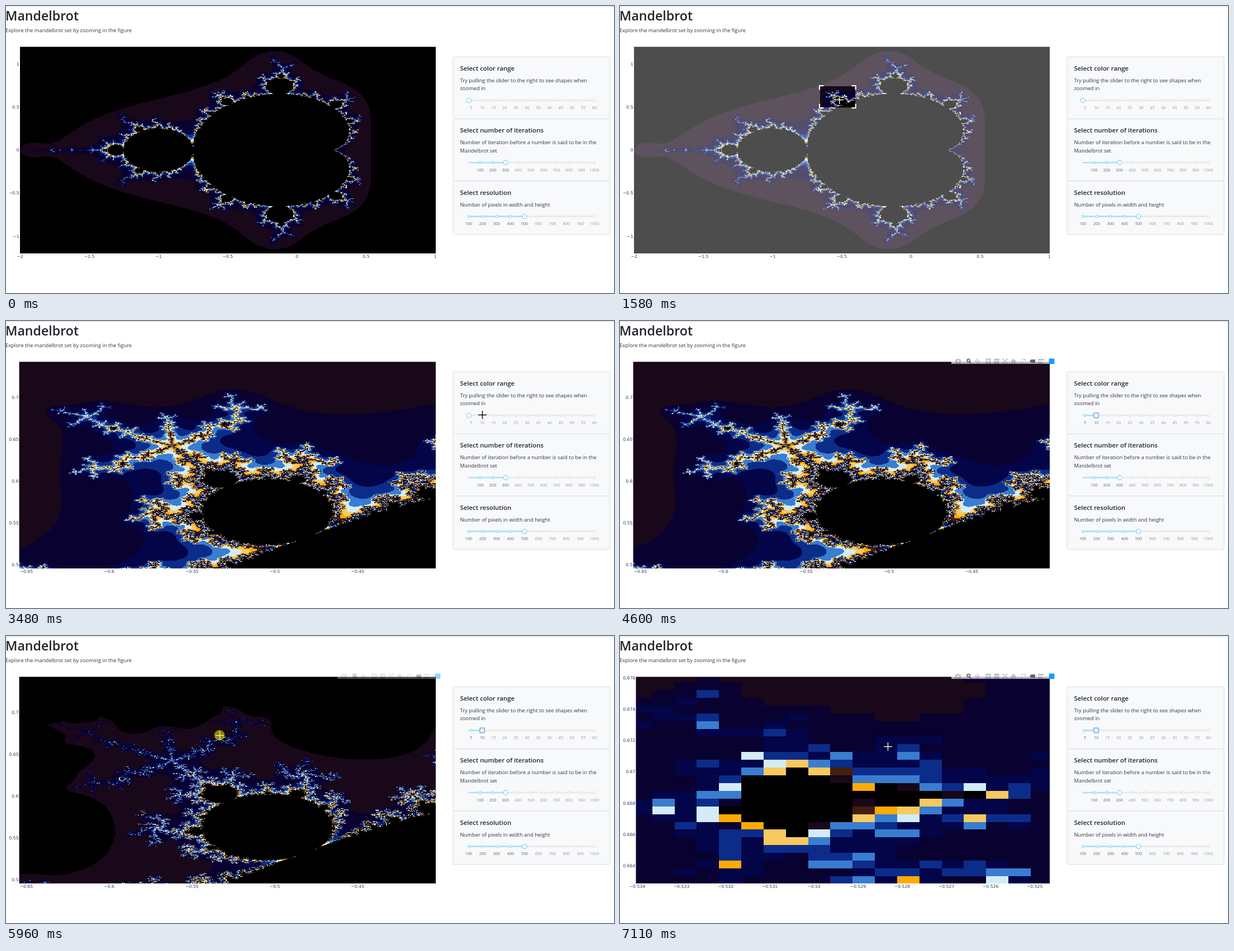
An HTML page with a canvas that plays this animation: 1088x515 px, repeating every 8 s.

```html
<!DOCTYPE html>
<html lang="en">
<head>
<meta charset="utf-8">
<title>Mandelbrot</title>
<style>
  html, body { margin: 0; width: 100%; height: 100%; overflow: hidden; background: #fff; }
  canvas, svg { position: absolute; left: 0; top: 0; width: 1088px; height: 515px; }
  text { font-family: "Open Sans", "Noto Sans", sans-serif; fill: #212529; }
  .h1 { font-size: 23.2px; font-weight: 600; }
  .h2 { font-size: 11.4px; font-weight: 600; }
  .p { font-size: 9.36px; fill: #32373c; }
  .mark { font-size: 7.4px; fill: #999; text-anchor: middle; }
  .on { fill: #666; }
  .tick { font: 7.7px "DejaVu Sans", Verdana, sans-serif; fill: #2a3f5f; }
  #invert { mix-blend-mode: difference; }
</style>
</head>
<body>
<canvas id="plot" width="1088" height="515"></canvas>
<svg id="page" viewBox="0 0 1088 515"></svg>
<svg id="invert" viewBox="0 0 1088 515"></svg>
<svg id="top" viewBox="0 0 1088 515"></svg>
<script>
const LOOP = 8000, GRID = 500, MAX_ITER = 300;
const RIGHT = 769, TOP = 73.2, BOTTOM = 444;
const BLACK = '000000';
const CYCLE = ['421e0f', '19071a', '09012f', '040449', '0c2c8a', '397dd1', 'd3ecf8', 'f8c95f', 'ffaa00'];
const $ = id => document.getElementById(id);

function add(parent, tag, attrs, text) {
  const el = document.createElementNS('http://www.w3.org/2000/svg', tag);
  for (const k in attrs) el.setAttribute(k, attrs[k]);
  if (text !== undefined) el.textContent = text;
  return parent.appendChild(el);
}
const show = (el, on) => { el.style.display = on ? '' : 'none'; };

// ticks: [first value, step, count]
const VIEWS = [
  { left: 24.6, x: [-2.003, 1.003], y: [-1.2024, 1.2024], xt: [-2, 0.5, 7], yt: [-1, 0.5, 5] },
  { left: 23.6, x: [-0.65434, -0.4029], y: [0.4955, 0.7429], xt: [-0.65, 0.05, 5], yt: [0.5, 0.05, 5] },
  { left: 28.5, x: [-0.53403, -0.52466], y: [0.66286, 0.67607], xt: [-0.534, 0.001, 10], yt: [0.664, 0.002, 7] }
];
const toX = (v, x) => v.left + (x - v.x[0]) / (v.x[1] - v.x[0]) * (RIGHT - v.left);
const toY = (v, y) => TOP + (v.y[1] - y) / (v.y[1] - v.y[0]) * (BOTTOM - TOP);

// ---- fractal data ----
function escapeCount(cx, cy) {
  const q = (cx - 0.25) ** 2 + cy * cy;
  if (q * (q + cx - 0.25) < cy * cy / 4 || (cx + 1) ** 2 + cy * cy < 1 / 16) return 0;
  let x = 0, y = 0;
  for (let k = 1; k <= MAX_ITER; k++) {
    const t = x * x - y * y + cx;
    y = 2 * x * y + cy;
    x = t;
    if (x * x + y * y > 4) return k;
  }
  return 0;
}

function sample(x, y) {
  const dx = (x[1] - x[0]) / (GRID - 1), dy = (y[1] - y[0]) / (GRID - 1);
  const counts = new Uint16Array(GRID * GRID);
  for (let j = 0; j < GRID; j++)
    for (let i = 0; i < GRID; i++)
      counts[j * GRID + i] = escapeCount(x[0] + i * dx, y[1] - j * dy);
  return { counts, x: [x[0] - dx / 2, x[1] + dx / 2], y: [y[0] - dy / 2, y[1] + dy / 2] };
}

// The set and the first band are black, later bands run through the cycle.
function paint(data, range) {
  const canvas = document.createElement('canvas');
  canvas.width = canvas.height = GRID;
  const g = canvas.getContext('2d'), img = g.createImageData(GRID, GRID);
  const rgb = h => [0, 2, 4].map(i => parseInt(h.substr(i, 2), 16));
  const black = rgb(BLACK), cycle = CYCLE.map(rgb);
  data.counts.forEach((k, p) => {
    const band = Math.floor((k - 1) / range);
    const c = band > 0 ? cycle[band % cycle.length] : black;
    img.data.set([c[0], c[1], c[2], 255], p * 4);
  });
  g.putImageData(img, 0, 0);
  return { canvas, x: data.x, y: data.y };
}

const wide = sample([-2, 1], [-1.2, 1.2]);
const close = sample(VIEWS[1].x, VIEWS[1].y);
const wideMap = paint(wide, 4), closeMap = paint(close, 4), closeMap10 = paint(close, 10);
const PHASES = [
  { t: 0, map: wideMap, view: 0 },
  { t: 1700, map: wideMap, view: 1 },
  { t: 3250, map: closeMap, view: 1 },
  { t: 4635, map: closeMap10, view: 1 },
  { t: 6950, map: closeMap10, view: 2 }
];

const ctx = $('plot').getContext('2d');
function drawPlot({ map, view }) {
  const v = VIEWS[view];
  ctx.clearRect(0, 0, 1088, 515);
  ctx.save();
  ctx.beginPath();
  ctx.rect(v.left, TOP, RIGHT - v.left, BOTTOM - TOP);
  ctx.clip();
  ctx.imageSmoothingEnabled = false;
  const x = toX(v, map.x[0]), y = toY(v, map.y[1]);
  ctx.drawImage(map.canvas, x, y, toX(v, map.x[1]) - x, toY(v, map.y[0]) - y);
  ctx.restore();
}

// ---- page ----
const page = $('page');
add(page, 'rect', { x: 0, y: 0.4, width: 1088, height: 1.2, fill: '#dcdce0' });
add(page, 'text', { class: 'h1', x: -1, y: 26.4 }, 'Mandelbrot');
add(page, 'text', { class: 'p', x: -1, y: 47.4 }, 'Explore the mandelbrot set by zooming in the figure');

const axes = VIEWS.map(v => {
  const g = add(page, 'g', {});
  const each = ([start, step, n], fn) => {
    for (let i = 0; i < n; i++) {
      const val = +(start + i * step).toFixed(3);
      fn(val, String(val).replace('-', '\u2212'));
    }
  };
  each(v.xt, (x, s) => add(g, 'text', { class: 'tick', x: toX(v, x), y: 452.4, 'text-anchor': 'middle' }, s));
  each(v.yt, (y, s) => add(g, 'text', { class: 'tick', x: v.left - 1, y: toY(v, y) + 2.8, 'text-anchor': 'end' }, s));
  return g;
});

function card(y, h, title, lines) {
  add(page, 'rect', { x: 800, y: y + 0.5, width: 281, height: h, rx: 2.5, fill: '#f8f9fb', stroke: '#dadcdf' });
  add(page, 'text', { class: 'h2', x: 812.5, y: y + 25 }, title);
  lines.forEach((s, i) => add(page, 'text', { class: 'p', x: 812.5, y: y + 46 + i * 14.7 }, s));
}

function slider(y, min, max, marks, value, focus) {
  const g = add(page, 'g', {}), px = v => 828 + (v - min) / (max - min) * 225;
  const bar = (to, fill) => add(g, 'rect', { x: 827.5, y: y - 1.3, width: to - 827.5, height: 2.6, rx: 1.3, fill });
  bar(1053.5, '#e9e9e9');
  bar(px(value), '#abe2fb');
  marks.forEach(m => {
    const on = m <= value;
    add(g, 'circle', { cx: px(m), cy: y, r: 2, fill: '#fff', stroke: on ? '#96dbfa' : '#e4e4e4', 'stroke-width': 1.3 });
    add(g, 'text', { class: on ? 'mark on' : 'mark', x: px(m), y: y + 15.6 }, m);
  });
  add(g, 'circle', { cx: px(value), cy: y, r: 4, fill: '#fff', stroke: '#8ed6f8', 'stroke-width': 1.4 });
  if (focus) add(g, 'rect', { x: px(value) - 4.4, y: y - 4.4, width: 8.8, height: 8.8, rx: 1,
                              fill: 'none', stroke: '#86aede', 'stroke-width': 1.4 });
  return g;
}

const steps = (from, step, n) => Array.from({ length: n }, (_, i) => from + i * step);
const hundreds = steps(100, 100, 10), fives = steps(5, 5, 12);
card(90.5, 111.5, 'Select color range', ['Try pulling the slider to the right to see shapes when', 'zoomed in']);
card(202, 111.5, 'Select number of iterations', ['Number of iteration before a number is said to be in the', 'Mandelbrot set']);
card(313.5, 96, 'Select resolution', ['Number of pixels in width and height']);
const rangeLow = slider(169.4, 4, 60, fives, 4), rangeHigh = slider(169.4, 4, 60, fives, 10, true);
slider(281, 10, 1000, hundreds, 300);
slider(377.6, 100, 1000, hundreds, 500);

// ---- zoom box and toolbar ----
const dim = add(page, 'path', { fill: '#fff', 'fill-rule': 'evenodd' });
const cornerEdge = add(page, 'path', { fill: 'none', stroke: '#444', 'stroke-width': 2.8 });
const corners = add(page, 'path', { fill: 'none', stroke: '#fff', 'stroke-width': 2 });

const bar = add(page, 'g', {});
add(bar, 'rect', { x: 593, y: 67, width: 175.5, height: 9.8, fill: '#fff', 'fill-opacity': 0.7 });
const ICONS = [
  [605, 'M-5 -3h2.5l1 -1.5h3l1 1.5h2.5v7h-10zM-2 .5a2 2 0 1 0 4 0a2 2 0 1 0 -4 0z'],
  [624, 'M-4 -1a3.6 3.6 0 1 1 6.6 2l2 2.4l-1.4 1.2l-2 -2.4a3.6 3.6 0 0 1 -5.2 -3.2zM-2.2 -1a1.8 1.8 0 1 0 3.6 0a1.8 1.8 0 1 0 -3.6 0z', 1],
  [639.5, 'M0 -5l2 2h-1.4v2.4h2.4v-1.4l2 2l-2 2v-1.4h-2.4v2.4h1.4l-2 2l-2 -2h1.4v-2.4h-2.4v1.4l-2 -2l2 -2v1.4h2.4v-2.4h-1.4z'],
  [659, 'M-4.5 -4.5h9v9h-9zM-.7 -3v2.3h-2.3v1.4h2.3v2.3h1.4v-2.3h2.3v-1.4h-2.3v-2.3z'],
  [674, 'M-4.5 -4.5h9v9h-9zM-3 -.7v1.4h6v-1.4z'],
  [689, 'M-4.5 -4.5h3l-1 1l2.5 2.5l2.5 -2.5l-1 -1h3v3l-1 -1l-2.5 2.5l2.5 2.5l1 -1v3h-3l1 -1l-2.5 -2.5l-2.5 2.5l1 1h-3v-3l1 1l2.5 -2.5l-2.5 -2.5l-1 1z'],
  [704, 'M0 -4.5l5 4.5h-1.4v4.5h-2.4v-3h-2.4v3h-2.4v-4.5h-1.4z'],
  [722, 'M-4 -4h2v1.2h-2zM-1 -4h5v5h-1.2v-3.8h-3.8zM-4 3h1.6v1.4h-1.6zM-4 0h1.6v1.4h-1.6z'],
  [738, 'M-5 0l2.5 -3h7.5v6h-7.5z', 1],
  [753, 'M-5 -4h10v3h-10zM-5 1h8v3h-8z']
];
ICONS.forEach(([x, d, on]) => add(bar, 'path', {
  d, transform: `translate(${x} 72)`, fill: '#444', 'fill-opacity': on ? 0.8 : 0.33, 'fill-rule': 'evenodd'
}));
add(bar, 'rect', { x: 767.7, y: 67.4, width: 9.6, height: 9.6, fill: '#119dff' });

// ---- pointer ----
const cross = add($('invert'), 'path', { d: 'M-7 .5h15M.5 -7v15', stroke: '#fff', 'stroke-width': 1.4 });
const pointer = d => add($('top'), 'path', { d, fill: '#fff', stroke: '#000', 'stroke-width': 0.8 });
const arrow = pointer('M0 0v15l3.4 -3.2l2.4 5.4l2.3 -1l-2.3 -5.2h4.8z');
const hand = pointer('M-1 .8a1 1 0 0 1 2 0v5l5 1.2q1.2 .4 1 1.8v3l-1.4 4h-6l-4 -6q-.2 -1.6 1.4 -.8l2 1.4z');
const press = add($('top'), 'circle', { r: 9.3, fill: '#fff000', 'fill-opacity': 0.53 });

const PATH = [
  [30, 899, 484], [830, 364, 150], [870, 364, 150], [1180, 421, 182], [1360, 421, 182],
  [1500, 358, 144], [1535, 358, 144], [1580, 392, 168], [1640, 404, 168], [1970, 404, 168],
  [2110, 349, 197], [2270, 349, 197], [2440, 640, 137], [2570, 849, 164], [2760, 849, 164],
  [2870, 852, 168], [3830, 852, 168], [3990, 534, 252], [4600, 534, 252], [5340, 380.5, 173.5],
  [5610, 380.5, 173.5], [5750, 381, 177], [5910, 381, 177], [5960, 382, 178], [6030, 385, 182],
  [6610, 408, 193], [6880, 408, 193], [7110, 479, 198], [LOOP, 479, 198]
];
const PRESSES = [[1180, 1535], [2840, 3230], [5910, 6610]];
const DRAGS = [
  { from: 1380, drop: 1500, to: 1700, fade: 80, view: 0, x: 420.8, y: 182 },
  { from: 5970, drop: 6610, to: 6950, fade: 72, view: 1, x: 380.5, y: 173.3 }
];
const BAR_FADES = [[290, 1], [1370, 0], [1690, 1], [3230, 0], [3880, 1], [5905, 0], [6980, 1]];

const clamp = p => Math.max(0, Math.min(1, p));
function pointerAt(t) {
  if (t <= PATH[0][0]) return PATH[0].slice(1);
  const i = PATH.findIndex(k => k[0] >= t), [t0, x0, y0] = PATH[i - 1], [t1, x1, y1] = PATH[i];
  let p = (t - t0) / (t1 - t0);
  if (t1 - t0 >= 300) p = p * p * (3 - 2 * p);
  return [x0 + (x1 - x0) * p, y0 + (y1 - y0) * p];
}

function barOpacity(t) {
  let o = 0;
  for (const [start, on] of BAR_FADES) if (t > start) {
    const p = clamp((t - start) / 100);
    o = on ? p : 1 - p;
  }
  return o;
}

function drawDrag(t) {
  const drag = DRAGS.find(d => t >= d.from && t < d.to);
  [dim, corners, cornerEdge].forEach(el => show(el, drag));
  if (!drag) return;
  const [cx, cy] = pointerAt(Math.min(t, drag.drop));
  const l = Math.min(cx, drag.x), r = Math.max(cx, drag.x);
  const u = Math.min(cy, drag.y), b = Math.max(cy, drag.y);
  const left = VIEWS[drag.view].left, open = r - l > 8 && b - u > 8;
  const hole = open ? `M${l} ${u}H${r}V${b}H${l}z` : '';
  dim.setAttribute('d', `M${left} ${TOP}H${RIGHT}V${BOTTOM}H${left}z${hole}`);
  dim.setAttribute('fill-opacity', 0.3 * clamp((t - drag.from) / drag.fade));
  const n = Math.min(6.5, (r - l) / 2, (b - u) / 2);
  const corner = (x, y, sx, sy) => `M${x - sx} ${y + sy * n}V${y - sy}H${x + sx * n}`;
  const d = open ? corner(l, u, 1, 1) + corner(r, u, -1, 1) + corner(l, b, 1, -1) + corner(r, b, -1, -1) : '';
  corners.setAttribute('d', d);
  cornerEdge.setAttribute('d', d);
}

let current = null;
function render(t) {
  const phase = PHASES.filter(p => p.t <= t).pop();
  if (phase !== current) {
    current = phase;
    drawPlot(phase);
    axes.forEach((g, i) => show(g, i === phase.view));
  }
  show(rangeLow, t < 3540);
  show(rangeHigh, t >= 3540);
  drawDrag(t);
  bar.setAttribute('opacity', barOpacity(t));

  const at = `translate(${pointerAt(t)})`;
  [cross, arrow, hand, press].forEach(el => el.setAttribute('transform', at));
  const isArrow = t < 290, isHand = t > 3500 && t < 3870;
  show(arrow, isArrow && t >= 30);
  show(hand, isHand);
  show(cross, !isArrow && !isHand);
  show(press, PRESSES.some(([a, b]) => t >= a && t < b));
}

const start = performance.now();
function tick() {
  render((performance.now() - start) % LOOP);
  requestAnimationFrame(tick);
}
tick();
</script>
</body>
</html>
```
